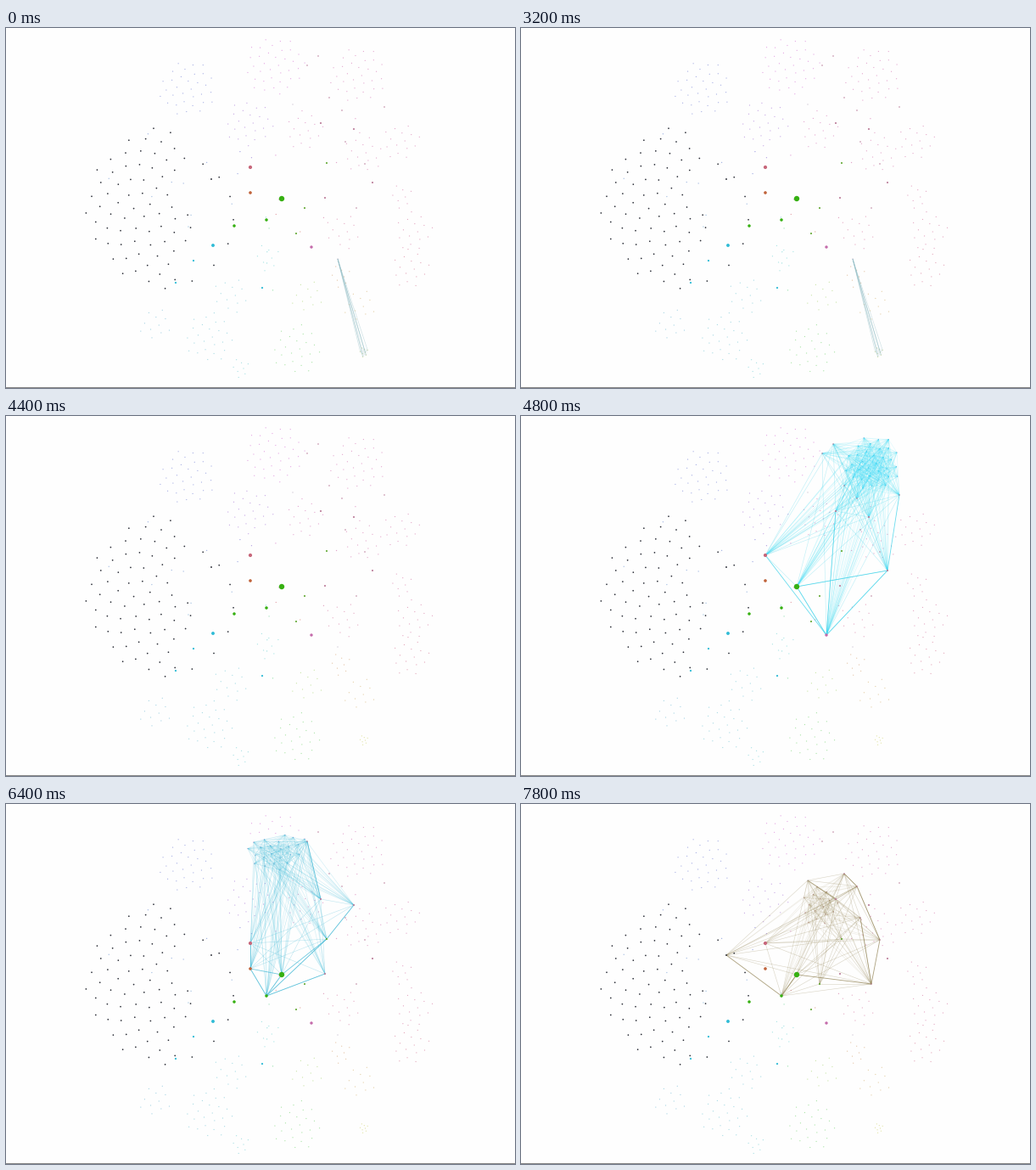
Recreate the animation shown at these times as a matplotlib script. Size 600x424 px, loop 8 s.

```python
from colorsys import hsv_to_rgb
from itertools import combinations

import numpy as np
import matplotlib.pyplot as plt
from matplotlib.animation import FuncAnimation
from matplotlib.collections import EllipseCollection, LineCollection

W, H, DPI = 600, 424, 100
PX = 72 / DPI
STEP, LOOP = 200, 8000
GOLDEN = np.pi * (3 - 5 ** 0.5)
CENTER = np.array([310, 215])

GREEN, CYAN, DARK, ROSE = "#36b012", "#30bcd6", "#2c2f38", "#bd7f9c"

# Key nodes; capitals take part in links
HUBS = dict(
    A=(288, 164), B=(325, 201), C=(352, 212), D=(376, 200), E=(378, 159),
    F=(410, 119), G=(396, 97), H=(368, 33), I=(355, 44), J=(371, 112),
    L=(288, 194), M=(307, 226), N=(360, 258), O=(432, 182), P=(446, 93),
    Q=(381, 82), R=(413, 212), S=(423, 160), T=(400, 134), U=(338, 90),
    W=(242, 178), Y=(391, 272),
    a=(269, 233), b=(342, 242), c=(244, 256), d=(302, 306), e=(221, 274),
    f=(200, 300),
)
STYLES = [  # keys, colour, diameter
    ("B", GREEN, 6.4), ("A", "#c8687c", 4.2), ("L", "#c0633a", 3.6),
    ("N", "#c56cab", 3.4), ("Ma", GREEN, 3.5), ("c", CYAN, 3.9),
    ("def", CYAN, 2.2), ("ECb", "#66ab38", 2.1), ("DJFO", ROSE, 2.1),
    ("GHIPQRST", ROSE, 1.5), ("UY", "#c3b9cc", 1.2), ("W", DARK, 1.9),
]

# Communities of tiny nodes: centre and radius
DISCS = dict(
    blue=(214, 72, 34), crown=(317, 44, 36), violet=(287, 112, 29),
    core=(352, 121, 24), crest=(415, 56, 34), cheek=(420, 147, 25),
    ear=(466, 133, 23), lobe=(467, 199, 15), moss=(398, 240, 22),
    side=(481, 240, 24), hip=(477, 284, 24), chin=(395, 293, 14),
    heel=(417, 328, 20), pale=(309, 271, 17), teal=(266, 315, 22),
    leaf=(355, 317, 20), aqua=(176, 350, 20), pool=(239, 364, 30),
    bay=(342, 378, 30), drop=(277, 401, 12), tip=(422, 382, 6),
)


def disc(x, y, r, gap=6.0):
    """Evenly packed points in a circle."""
    n = max(8, round((r / gap) ** 2))
    k = np.arange(n)
    rad, turn = r * np.sqrt((k + 0.5) / n), k * GOLDEN
    return np.c_[x + rad * np.cos(turn), y + rad * np.sin(turn)]


def tint(x, y):
    """Hue follows the direction from the centre."""
    dx, dy = np.array([x, y]) - CENTER
    angle = (np.degrees(np.arctan2(dy, dx)) - 90) % 360
    hue = np.interp(angle, [0, 150, 190, 290, 360], [0.5, 0.65, 0.88, 0.93, 1.4])
    return hsv_to_rgb(hue % 1, 0.28, 0.89)


fig = plt.figure(figsize=(W / DPI, H / DPI), dpi=DPI, facecolor="#fefefe")
ax = fig.add_axes([0, 0, 1, 1])
ax.set(xlim=(0, W), ylim=(H, 0))
ax.axis("off")


def dots(points, size, color, z=3):
    size = np.full(len(points), size)
    ax.add_collection(EllipseCollection(
        size, size, 0 * size, units="xy", offsets=points,
        offset_transform=ax.transData, facecolors=color, linewidths=0, zorder=z))


def lines(segments, color, width, alpha):
    art = LineCollection(segments, colors=color, linewidths=width * PX,
                         alpha=alpha, zorder=2, visible=False)
    ax.add_collection(art)
    return art


def web(points, hubs, color, pale, strong="", inner=0.1, outer=0.22, share=0.6):
    """Link points with each other and with hubs; stress some hub pairs."""
    rng = np.random.default_rng(4)
    some = lambda links: [s for s in links if rng.random() < share]
    ends = [HUBS[h] for h in hubs]
    bold = [(HUBS[a], HUBS[b]) for a, b in strong.split()]
    return [
        lines(some(combinations(points, 2)), pale, 0.6, inner),
        lines(some((p, e) for p in points for e in ends), pale, 0.6, outer),
        lines(some(combinations(ends, 2)), color, 0.6, 0.3),
        lines(bold, color, 0.85, 0.7),
    ]


groups = {name: disc(*spec) for name, spec in DISCS.items()}
for name, points in groups.items():
    dots(points, 1.2, tint(*DISCS[name][:2]), 1)

# The dark community thins out towards the centre
dark = disc(189, 211, 96, gap=9.2)
keep = (dark[:, 0] < 200) | (np.arange(len(dark)) % 4 == 0)
dots(dark[keep], 1.7, DARK)

for x, y in np.random.default_rng(7).normal(CENTER, (75, 70), (24, 2)):
    dots([(x, y)], 1.3, tint(x, y), 1)
for keys, color, size in STYLES:
    dots([HUBS[k] for k in keys], size, color)
ax.axhline(422.5, color="#858585", lw=PX, zorder=4)

upper = groups["crown"][:, 1] < 36
WEBS = dict(
    fan=web(groups["tip"], "Y", "#8fbcc4", "#8fbcc4", outer=0.45, share=1),
    pink=web(groups["crown"][upper], "ABCDEFGHIJ", "#c238b0", "#ee6cc8",
             "AB BF BG BD BE AG AF CJ CD DE EF GI FG FI DI BI",
             inner=0.18, outer=0.26),
    cyan=web(groups["crest"], "ABNOPJGQFIH", "#2ccfe8", "#38e0f8",
             "AN BN BO NO OP JN", inner=0.16, outer=0.2),
    sky=web(groups["crown"][~upper], "ALBMDEFJI", "#35b4d3", "#45c0dd",
            "AL LB LM MB ME MD BE EF IJ", inner=0.18, outer=0.24),
    olive=web(groups["core"], "WMBRSTGQUJCEA", "#8a7a48", "#9a8a58",
              "BR MB WM SR TR QG GS UJ", inner=0.13, outer=0.16),
)
CUES = [(0, "fan"), (3600, "pink"), (4400, None), (4800, "cyan"),
        (6200, "sky"), (7400, "olive")]


def draw(i):
    active = [name for start, name in CUES if start <= i * STEP][-1]
    for name, arts in WEBS.items():
        for art in arts:
            art.set_visible(name == active)
    return []


anim = FuncAnimation(fig, draw, frames=LOOP // STEP, interval=STEP,
                     repeat=True, repeat_delay=0, blit=False)
plt.show()
```
